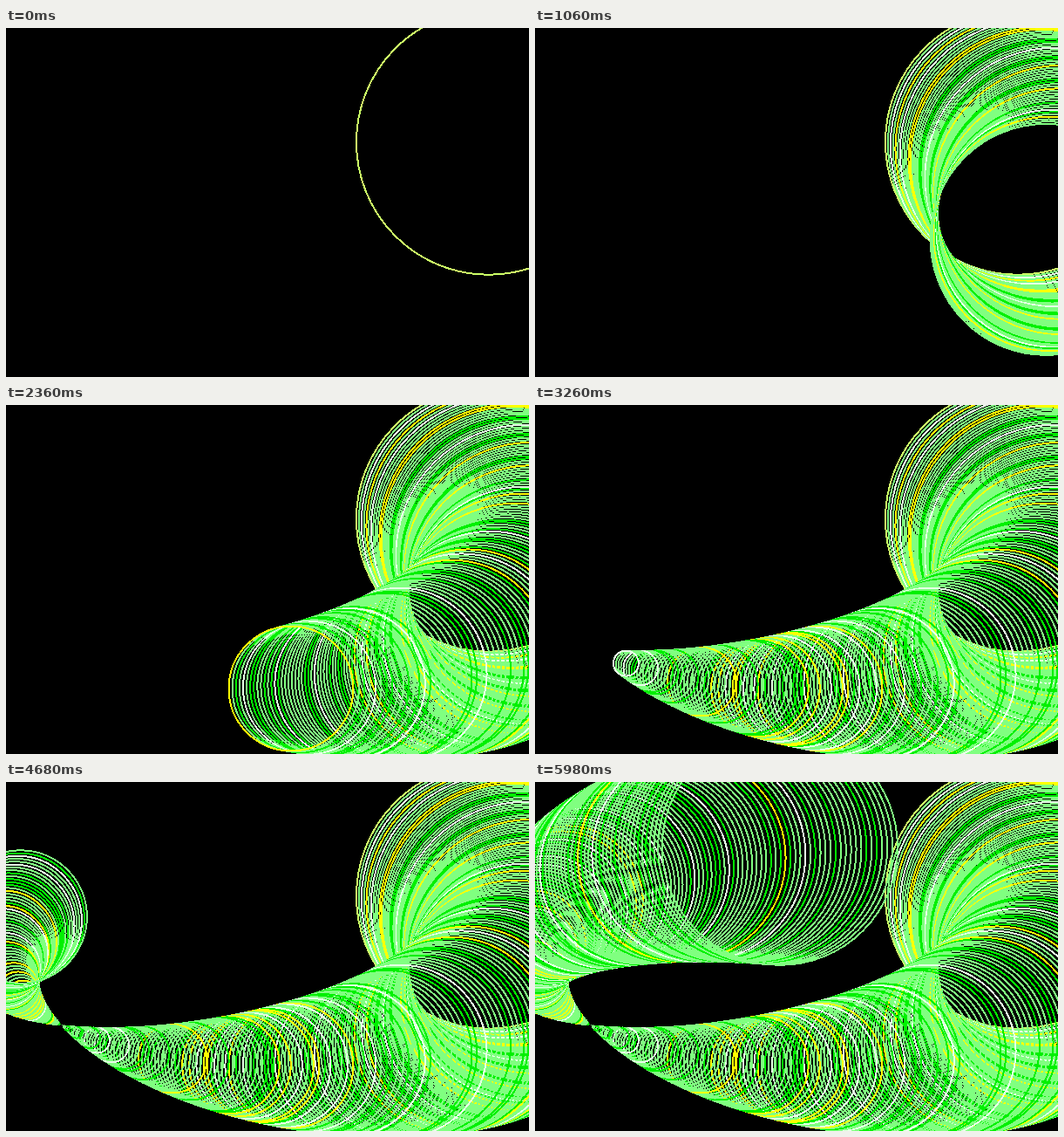
An HTML page that plays this animation: 600 by 400 pixels, repeating every 6 s.

```html
<!DOCTYPE html>
<html lang="en">
<head>
<meta charset="utf-8">
<title>Ring trail</title>
<style>
  html, body { margin: 0; width: 100%; height: 100%; overflow: hidden; background: #000; }
  svg { display: block; width: 600px; height: 400px; }
</style>
</head>
<body>
<svg id="stage" viewBox="0 0 600 400" fill="none" stroke-width="2" shape-rendering="crispEdges"></svg>
<script>
const LOOP = 6000, STEP = 20, COUNT = LOOP / STEP;
const TURN = 0.0175; // radians per ring
const stage = document.getElementById('stage');

// Small seeded generator, so every load draws the same colours.
let seed = 7;
function random() {
  seed = (seed * 1664525 + 1013904223) % 4294967296;
  return seed / 4294967296;
}

function pickColor() {
  const v = random();
  if (v < 0.62) return '#80ff80';
  if (v < 0.84) return '#00f000';
  if (v < 0.92) return '#e6ffe6';
  return '#ffff00';
}

// The centre runs along an ellipse while the radius swings at half that speed.
function makeRing(i) {
  const angle = TURN * i - 0.583;
  const ring = document.createElementNS('http://www.w3.org/2000/svg', 'circle');
  ring.setAttribute('cx', 300 + 304 * Math.cos(angle));
  ring.setAttribute('cy', 200 + 125.5 * Math.sin(angle));
  ring.setAttribute('r', Math.abs(152 * Math.cos(TURN * i / 2 + 0.049)));
  ring.setAttribute('stroke', i ? pickColor() : '#ccff66');
  ring.setAttribute('display', 'none');
  return stage.appendChild(ring);
}

const rings = Array.from({ length: COUNT }, (_, i) => makeRing(i));
let shown = -1;

function render(time) {
  const last = Math.floor((time % LOOP) / STEP);
  if (last === shown) return;
  shown = last;
  rings.forEach((ring, i) => ring.setAttribute('display', i <= last ? 'inline' : 'none'));
}

const start = performance.now();
function tick() {
  render(performance.now() - start);
  requestAnimationFrame(tick);
}
render(0);
requestAnimationFrame(tick);
</script>
</body>
</html>
```
